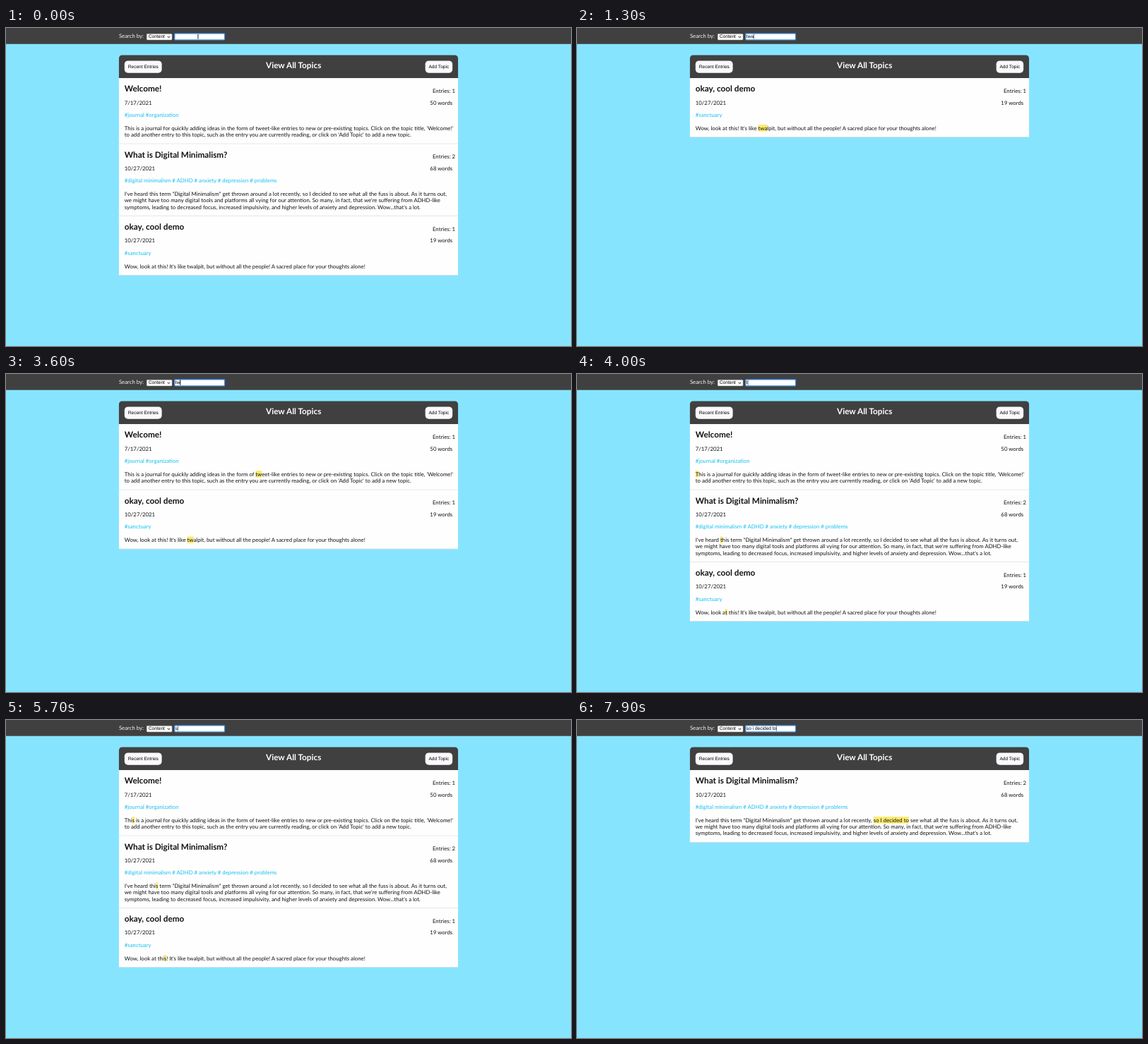
Write an HTML page that moves like this. It is 800 px wide and 451 px high and loops after 8000 ms.

```html
<!DOCTYPE html>
<html lang="en">
<head>
<meta charset="utf-8">
<title>View All Topics</title>
<style>
  html, body { margin: 0; width: 100%; height: 100%; overflow: hidden; background: #87e4ff; }
  #page {
    position: absolute; left: 0; top: 0; width: 1622px; height: 914px;
    transform: scale(.4935); transform-origin: 0 0;
    font: 15.8px/19px Lato, sans-serif; color: #111;
    text-rendering: geometricPrecision; white-space: nowrap;
  }
  #page * { box-sizing: border-box; }
  .ui { font: 13.333px/16px "Liberation Sans", Arial, sans-serif; color: #000; }
  nav { position: absolute; left: 0; top: 0; width: 100%; height: 46px; background: #404040; }
  nav > * { position: absolute; }
  nav label { left: 324px; top: 14px; color: #f4f4f4; }
  .select {
    left: 403px; top: 16px; width: 74px; height: 19px; padding-left: 5px;
    background: #fefefe; border: 1px solid #767676; border-radius: 3px;
  }
  .select svg { position: absolute; right: 4px; top: 5px; }
  .field {
    left: 485px; top: 17px; width: 141px; height: 16px; padding-left: 1px; white-space: pre;
    background: #fff; border-radius: 1px; box-shadow: 0 0 0 2.5px #3f8fe8;
  }
  #caret { display: inline-block; width: 1.5px; height: 15px; background: #000; vertical-align: top; }
  #pointer { left: 547px; top: 18px; }
  main { position: absolute; left: 324px; top: 78px; width: 973px; }
  header {
    display: flex; justify-content: space-between; align-items: flex-start;
    height: 65.5px; padding: 16px 16px 0; background: #404040; border-radius: 9px 9px 0 0;
  }
  h2 { margin: 0; font-size: 23.8px; line-height: 29px; font-weight: 700; }
  header h2 { color: #fdfdfd; }
  .button { height: 35px; padding: 10px; line-height: 15px; background: #fbf9fc; border-radius: 10px; }
  article {
    position: relative; padding: 134px 16px 16px; background: #fefefe; border-bottom: 1px solid #ccc;
  }
  article > :not(p) { position: absolute; left: 16px; }
  article h2 { top: 17px; }
  article .count { top: 27px; left: auto; right: 8px; }
  article .date { top: 61.5px; }
  article .words { top: 61.5px; left: auto; right: 16px; }
  article .tags { top: 96.5px; color: #16bff0; }
  article p { margin: 0; white-space: pre; }
  mark { background: #fdea6c; color: inherit; }
</style>
</head>
<body>
<div id="page">
  <nav>
    <label>Search by:</label>
    <div class="select ui">Content<svg width="10" height="8" fill="none" stroke="#000" stroke-width="2"><path d="M1.5 2 5 5.5 8.5 2"/></svg></div>
    <div class="field ui"><span id="query"></span><span id="caret"></span></div>
    <svg id="pointer" width="8" height="14" fill="none" stroke="#222" stroke-width="1.2"><path d="M1 1q3 0 3 2v8q0 2-3 2M7 1q-3 0-3 2v8q0 2 3 2"/></svg>
  </nav>
  <main>
    <header>
      <div class="button ui">Recent Entries</div>
      <h2>View All Topics</h2>
      <div class="button ui">Add Topic</div>
    </header>
    <div id="list"></div>
  </main>
</div>
<script>
const topics = [
  { title: "Welcome!", date: "7/17/2021", count: 1, words: 50, tags: "#journal #organization",
    text: `This is a journal for quickly adding ideas in the form of tweet-like entries to new or pre-existing topics. Click on the topic title, 'Welcome!'
to add another entry to this topic, such as the entry you are currently reading, or click on 'Add Topic' to add a new topic.` },
  { title: "What is Digital Minimalism?", date: "10/27/2021", count: 2, words: 68,
    tags: "#digital minimalism # ADHD # anxiety # depression # problems",
    text: `I've heard this term "Digital Minimalism" get thrown around a lot recently, so I decided to see what all the fuss is about. As it turns out,
we might have too many digital tools and platforms all vying for our attention. So many, in fact, that we're suffering from ADHD-like
symptoms, leading to decreased focus, increased impulsivity, and higher levels of anxiety and depression. Wow...that's a lot.` },
  { title: "okay, cool demo", date: "10/27/2021", count: 1, words: 19, tags: "#sanctuary",
    text: "Wow, look at this! It's like twalpit, but without all the people! A sacred place for your thoughts alone!" }
];

const LOOP = 8000, BLINK = 500, FIRST_KEY = 800;
const WORD = "twalpit", PHRASE = "so i decided to";

// Key presses: [time, word, letters shown]
const keys = [
  [-700, WORD, 0],
  [800, WORD, 1], [1000, WORD, 2], [1200, WORD, 3], [1500, WORD, 4],
  [1700, WORD, 5], [2100, WORD, 6], [2200, WORD, 7],
  [2900, WORD, 6], [3100, WORD, 5], [3200, WORD, 4], [3400, WORD, 3],
  [3600, WORD, 2], [3800, WORD, 1], [4200, WORD, 0],
  [5600, PHRASE, 1], [5800, PHRASE, 2], [5900, PHRASE, 3], [6100, PHRASE, 4],
  [6200, PHRASE, 5], [6400, PHRASE, 6], [6500, PHRASE, 7], [6700, PHRASE, 8],
  [7100, PHRASE, 9], [7200, PHRASE, 10], [7400, PHRASE, 11], [7500, PHRASE, 12],
  [7700, PHRASE, 13], [7800, PHRASE, 14], [7900, PHRASE, 15]
];

const $ = id => document.getElementById(id);

function highlight(text, query) {
  const at = text.toLowerCase().indexOf(query), end = at + query.length;
  return query ? `${text.slice(0, at)}<mark>${text.slice(at, end)}</mark>${text.slice(end)}` : text;
}

function showResults(query) {
  $("query").textContent = query;
  $("list").innerHTML = topics
    .filter(t => t.text.toLowerCase().includes(query))
    .map(t => `<article><h2>${t.title}</h2><div class="count">Entries: ${t.count}</div>` +
      `<div class="date">${t.date}</div><div class="words">${t.words} words</div>` +
      `<div class="tags">${t.tags}</div><p>${highlight(t.text, query)}</p></article>`)
    .join("");
}

const start = performance.now();
let shown = null;

function draw() {
  const time = (performance.now() - start) % LOOP;
  const [since, word, length] = keys.findLast(key => key[0] <= time);
  const query = word.slice(0, length);
  if (query !== shown) showResults(shown = query);
  const caretOn = Math.floor((time - since) / BLINK) % 2 === 0;
  $("caret").style.visibility = caretOn ? "visible" : "hidden";
  $("pointer").style.visibility = time < FIRST_KEY ? "visible" : "hidden";
  requestAnimationFrame(draw);
}
draw();
</script>
</body>
</html>
```
